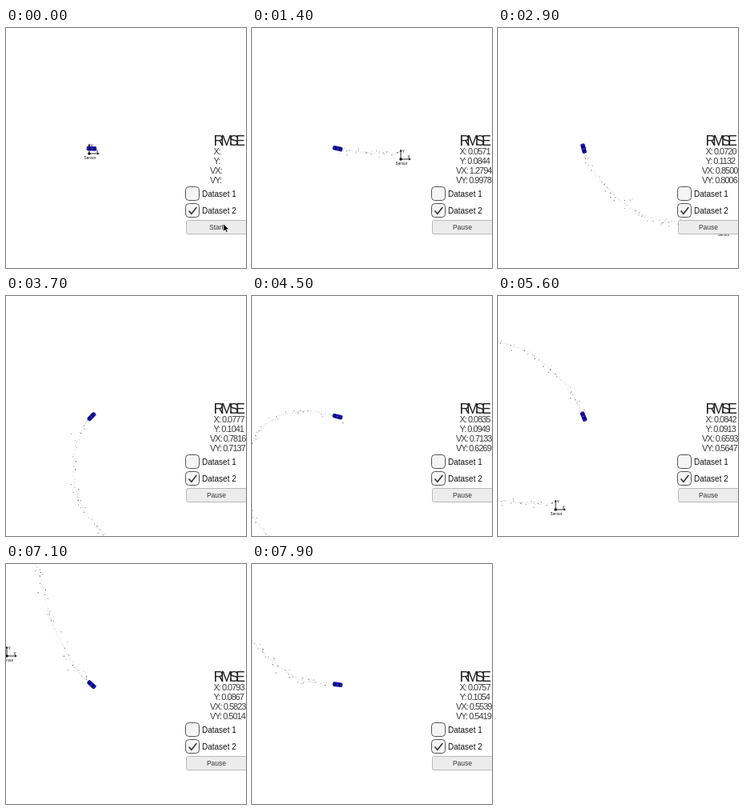
Recreate the animation shown at these times as an HTML page with a canvas. Size 300x300 px, loop 8000 ms.

```html
<!DOCTYPE html>
<html lang="en">
<head>
<meta charset="utf-8">
<title>Tracking simulator</title>
<style>
html, body { margin: 0; width: 100%; height: 100%; overflow: hidden; background: #fff; }
canvas { display: block; width: 300px; height: 300px; }
</style>
</head>
<body>
<canvas id="stage" width="300" height="300"></canvas>
<script>
const ctx = document.getElementById('stage').getContext('2d');
const LOOP = 8000, STEP = 100, START = 400;
const CAR = { x: 107, y: 151 };
const SANS = '"Liberation Sans", Arial, sans-serif';

// Route of the car, relative to the sensor
const route = [
  [3, -6], [-36, -8], [-79, -13], [-107, -23], [-133, -42], [-160, -71],
  [-174, -102], [-178, -140], [-167, -178], [-144, -203], [-106, -214],
  [-62, -207], [-30, -195], [-3, -172], [19, -148], [35, -116],
  [45, -84], [56, -45], [78, 2], [106, 36], [147, 63], [193, 70]
];
// [time, route index]
const passes = [[300, 0], [1400, 2], [2900, 6], [4500, 11], [5600, 15], [7100, 19], [7900, 21]];

// [time, X, Y, VX, VY]
const errors = [
  [400, 0.0312, 0.0617, 1.8735, 1.2418],
  [1400, 0.0571, 0.0844, 1.2794, 0.9978],
  [2900, 0.0720, 0.1132, 0.8500, 0.8006],
  [4500, 0.0835, 0.0949, 0.7133, 0.6269],
  [5600, 0.0842, 0.0913, 0.6593, 0.5647],
  [7100, 0.0793, 0.0867, 0.5823, 0.5014],
  [7900, 0.0757, 0.1054, 0.5539, 0.5419]
];

const lerp = (a, b, k) => a + (b - a) * k;

function interpolate(keys, t, col) {
  if (t <= keys[0][0]) return keys[0][col];
  for (let i = 1; i < keys.length; i++) {
    const a = keys[i - 1], b = keys[i];
    if (t <= b[0]) return lerp(a[col], b[col], (t - a[0]) / (b[0] - a[0]));
  }
  return keys[keys.length - 1][col];
}

function spline(a, b, c, d, u) {
  return 0.5 * (2 * b + (c - a) * u + (2 * a - 5 * b + 4 * c - d) * u * u
    + (3 * b - a - 3 * c + d) * u * u * u);
}

// Dense samples with travelled length
const SUB = 20;
const track = [{ x: route[0][0], y: route[0][1], len: 0 }];
for (let i = 0; i < route.length - 1; i++) {
  const p = [-1, 0, 1, 2].map(k => route[Math.min(route.length - 1, Math.max(0, i + k))]);
  for (let s = 1; s <= SUB; s++) {
    const [x, y] = [0, 1].map(k => spline(p[0][k], p[1][k], p[2][k], p[3][k], s / SUB));
    const last = track[track.length - 1];
    track.push({ x, y, len: last.len + Math.hypot(x - last.x, y - last.y) });
  }
}
const total = track[track.length - 1].len;
const distances = passes.map(([t, i]) => [t, track[i * SUB].len]);

function locate(len) {
  let i = 1;
  while (i < track.length - 1 && track[i].len < len) i++;
  const a = track[i - 1], b = track[i];
  const k = (len - a.len) / (b.len - a.len);
  return { x: lerp(a.x, b.x, k), y: lerp(a.y, b.y, k), angle: Math.atan2(b.y - a.y, b.x - a.x) };
}

let seed = 29;
function random() {
  seed = (seed * 16807) % 2147483647;
  return seed / 2147483647;
}
const spread = size => (random() + random() + random() - 1.5) * size;

// Faint estimates hug the route, darker measurements scatter around it
const dots = [];
for (let len = 4; len < total; len += 2.7) {
  const p = locate(len);
  dots.push({ len, x: p.x + spread(1.2), y: p.y + spread(1.2), size: 0.9, shade: 0.18 + random() * 0.15 });
  if (random() < 0.55) {
    const wide = random() < 0.3 ? 9 : 4.5;
    dots.push({ len, x: p.x + spread(wide), y: p.y + spread(wide), size: 0.9 + random() * 0.3, shade: 0.3 + random() * 0.5 });
  }
}

function text(str, x, y, size, color, spacing = 0, align = 'left') {
  ctx.font = `${size}px ${SANS}`;
  ctx.letterSpacing = spacing + 'px';
  ctx.textAlign = align;
  ctx.fillStyle = color;
  ctx.fillText(str, x, y);
}

function box(x, y, w, h, r, fill, stroke) {
  ctx.beginPath();
  ctx.roundRect(x, y, w, h, r);
  ctx.fillStyle = fill;
  ctx.fill();
  if (stroke) {
    ctx.strokeStyle = stroke;
    ctx.lineWidth = 1;
    ctx.stroke();
  }
}

function shape(points, color) {
  ctx.beginPath();
  points.forEach(([x, y]) => ctx.lineTo(x, y));
  ctx.closePath();
  ctx.fillStyle = color;
  ctx.fill();
}

function drawSensor(x, y) {
  ctx.save();
  ctx.translate(x, y);
  ctx.strokeStyle = '#111';
  ctx.lineWidth = 0.9;
  ctx.beginPath();
  ctx.moveTo(0, -10);
  ctx.lineTo(0, 0);
  ctx.lineTo(11, 0);
  ctx.stroke();
  shape([[0, -12.5], [1.6, -9.5], [-1.6, -9.5]], '#111');
  shape([[13, 0], [10, -1.6], [10, 1.6]], '#111');
  ctx.beginPath();
  ctx.arc(0, 0, 1.8, 0, Math.PI * 2);
  ctx.fill();
  text('Y', 3.2, -8.3, 5, '#111', 0, 'center');
  text('X', 9.8, -1.4, 5, '#111', 0, 'center');
  text('Sensor', 1, 7.2, 4.7, '#111', 0, 'center');
  ctx.restore();
}

function drawCar(angle) {
  ctx.save();
  ctx.translate(CAR.x, CAR.y - 0.3);
  ctx.rotate(angle);
  box(-6.3, -2.8, 12.6, 5.6, 2, '#1a16ae');
  box(-4, -2, 2, 4, 0.7, '#0b0860');
  box(1.2, -2, 2.3, 4, 0.7, '#0b0860');
  box(-0.8, -0.5, 1.1, 1, 0.3, '#5a58c8');
  box(4.2, -0.5, 1, 1, 0.3, '#4a48c0');
  ctx.restore();
}

function drawErrors(t) {
  text('RMSE', 259.5, 146.5, 18, '#222', -4.2);
  [['X:', 259.5], ['Y:', 259.5], ['VX:', 255], ['VY:', 255]].forEach(([name, x], i) => {
    const value = t < START ? '' : ' ' + interpolate(errors, t, i + 1).toFixed(4);
    text(name + value, x, 158.3 + i * 11.9, 11, '#3c3c3c', -1);
  });
}

function drawControls(idle) {
  [198.5, 219.5].forEach((y, i) => {
    box(224.5, y, 17, 17, 4, '#f5f5f5', '#555');
    text('Dataset ' + (i + 1), 245, y + 12, 10, '#111');
  });
  ctx.strokeStyle = '#333';
  ctx.lineWidth = 1.6;
  ctx.beginPath();
  ctx.moveTo(228.5, 228.5);
  ctx.lineTo(231.8, 232.3);
  ctx.lineTo(238.3, 224);
  ctx.stroke();
  box(225.5, 240.5, 76, 17, 2, '#ececec', '#b8b8b8');
  text(idle ? 'Start' : 'Pause', 263, 252.2, 8.5, '#383838', 0, 'center');
  if (idle) {
    const cursor = [[0, 0], [0, 9.5], [2.2, 7.5], [3.6, 10.6], [5.2, 9.9], [3.9, 6.9], [6.8, 6.8]];
    ctx.save();
    ctx.translate(271.8, 244.8);
    shape(cursor, '#000');
    ctx.strokeStyle = '#fff';
    ctx.lineWidth = 0.6;
    ctx.stroke();
    ctx.restore();
  }
}

function draw(t) {
  const idle = t < START;
  const len = idle ? 0 : interpolate(distances, t, 1);
  const car = locate(len);
  const x = CAR.x - car.x, y = CAR.y - car.y;

  ctx.fillStyle = '#fff';
  ctx.fillRect(0, 0, 300, 300);
  for (const d of dots) {
    if (d.len > len) break;
    ctx.fillStyle = `rgba(20, 20, 25, ${d.shade})`;
    ctx.fillRect(x + d.x - d.size / 2, y + d.y - d.size / 2, d.size, d.size);
  }
  drawSensor(x, y);
  drawCar(car.angle);
  drawErrors(t);
  drawControls(idle);
}

function tick() {
  const t = performance.now() % LOOP;
  draw(Math.floor(t / STEP) * STEP);
  requestAnimationFrame(tick);
}
tick();
</script>
</body>
</html>
```
